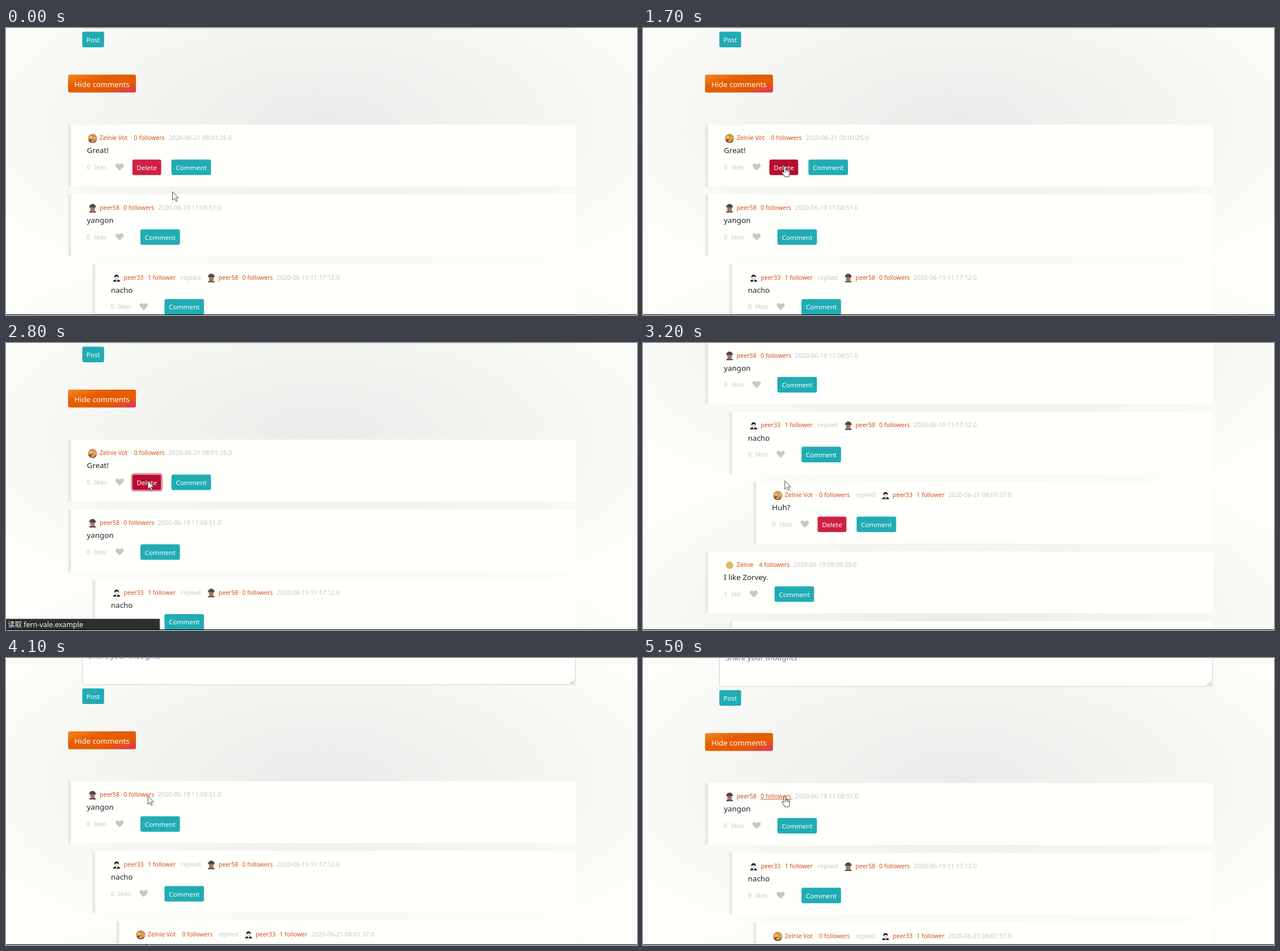
An HTML page for the animation above (5600 ms loop, 1108 px wide and 505 px high).

```html
<!DOCTYPE html>
<html lang="en">
<head>
<meta charset="utf-8">
<title>Comment thread</title>
<style>
  html, body { margin: 0; width: 100%; height: 100%; overflow: hidden; }
  #stage {
    position: relative; width: 1108px; height: 505px; overflow: hidden;
    background: radial-gradient(ellipse farthest-corner at center, #ebece9, #fdfefa 87%) 0 0 / 1108px 505px;
  }
  svg { position: absolute; inset: 0; display: block; }
  text { font-family: "Noto Sans", "Open Sans", sans-serif; white-space: pre; }
  .link { font-size: 10.5px; fill: #d4501a; }
  .soft { font-size: 10.6px; fill: #c6c8c7; }
  .date { font-size: 10.8px; fill: #c3c5c5; }
  .body { font-size: 13.3px; fill: #212529; }
  .btn { font-size: 11.65px; fill: #fff; }
  .big { font-size: 13.1px; fill: #fff; }
  .hint { font-size: 13.1px; fill: #6c757d; }
  .status { font-size: 12.4px; fill: #f1f1f1; font-family: "Noto Sans", "Noto Sans CJK SC", "Noto Sans CJK", sans-serif; }
</style>
</head>
<body>
<div id="stage">
<svg width="1108" height="505" viewBox="0 0 1108 505">
  <defs>
    <linearGradient id="warm" x1="0" y1="0" x2="1" y2="1">
      <stop offset="0" stop-color="#f6891f"/>
      <stop offset=".35" stop-color="#e65c00"/>
      <stop offset=".68" stop-color="#e65c00"/>
      <stop offset="1" stop-color="#dc3265"/>
    </linearGradient>
    <g id="amber">
      <circle r="8" fill="#d2924a"/>
      <path d="M-7.4 3Q-3 0 0 3T7.4 3A8 8 0 0 1-7.4 3Z" fill="#74502f"/>
      <ellipse cx="-3" cy="-2" rx="2.6" ry="2" fill="#edc98c"/>
      <ellipse cx="3.4" cy="-1" rx="2.4" ry="2.2" fill="#e2ad5f"/>
      <ellipse cx="0" cy="4.6" rx="3.4" ry="1.5" fill="#d9a866"/>
    </g>
    <g id="rider">
      <path d="M-6 7.6Q-5.6 4 0 4T6 7.6Z" fill="#55545a"/>
      <ellipse cy="1" rx="4.2" ry="4.8" fill="#a87563"/>
      <path d="M-6.2-1.4Q-4.8-7.6 0-7.6T6.2-1.4Z" fill="#514747"/>
    </g>
    <g id="dark">
      <path d="M-6.4 6.4Q-5.8 2.6 0 2.6T6.4 6.4Z" fill="#1d1d20"/>
      <path d="M-2 3L0 6.4 2 3Z" fill="#f3f1ee"/>
      <ellipse cy="-.4" rx="3.2" ry="3.6" fill="#e6dcd6"/>
      <path d="M-4 0Q-4.8-6-.2-6T4 0Q3.2-3 0-2.8T-4 0Z" fill="#19191b"/>
    </g>
    <g id="gold"><circle r="6.5" fill="#e3b765"/></g>
    <path id="heart" d="M0 6.4L-6 .3C-9.2-3.2-5.4-8.2-1-4.9L0-3.9 1-4.9C5.4-8.2 9.2-3.2 6 .3Z" fill="#c6c7c7"/>
  </defs>
  <g id="page"></g>
  <g id="note">
    <rect x="-1" y="485.5" width="271" height="20" fill="#2e2e30" stroke="#77787a"/>
    <text class="status" x="3" y="500">读取 fern-vale.example</text>
  </g>
  <rect y="504" width="1108" height="1" fill="#000"/>
  <g id="arrow" fill="#fff" stroke="#3c3c3c" stroke-width=".9">
    <path d="M0 0V15L3.6 11.6 6 17 8.1 16.1 5.8 10.8H10.4Z"/>
  </g>
  <g id="hand" fill="#fff" stroke="#2c2c2c" stroke-width=".9" stroke-linejoin="round">
    <path d="M-1.5 12V2.2a1.5 1.5 0 0 1 3 0V7.4a1.4 1.4 0 0 1 2.6.3a1.4 1.4 0 0 1 2.5.5a1.3 1.3 0 0 1 2.1 1.1V13.5c0 2-1 3-1.2 6H-.2c-.5-2.5-3-4.5-4.6-7.2c-.9-1.8.9-2.6 1.9-1.6Z"/>
    <path d="M1.5 7.4v3.6M4.1 7.7v3.5M6.6 8.3v3" fill="none"/>
  </g>
</svg>
</div>
<script>
const $ = id => document.getElementById(id);
const LOOP = 5600, PITCH = 122.8, INDENT = 42.3, META = 27.2;
const PAPER = "#fffffc", TEAL = "#21acb4", RED = "#cf2045", DEEP_RED = "#b80d31";

const text = (cls, x, y, s, anchor = "start") =>
  `<text class="${cls}" x="${x}" y="${y}" text-anchor="${anchor}">${s}</text>`;
const box = (x, y, w, h, fill, extra = "") =>
  `<rect x="${x}" y="${y}" width="${w}" height="${h}" fill="${fill}" ${extra}/>`;
const button = (x, y, w, label, fill, id = "") =>
  box(x, y, w, 27.4, fill, `rx="3" ${id && `id="${id}"`}`) +
  text("btn", x + w / 2, y + 18.4, label, "middle");
const icon = (name, x, y) => `<use href="#${name}" x="${x}" y="${y}"/>`;

// One person: avatar, name, dot and follower count, at offsets from x
const person = ([face, name, count], x, dotX, countX) =>
  icon(face, x, 24.3) + text("link", x + 12.5, META, name) +
  text("soft", dotX, META, "·", "middle") + text("link", countX, META, count);

const ZELNIE_V = ["amber", "Zelnie Vot", "0 followers"];
const PEER_58 = ["rider", "peer58", "0 followers"];
const PEER_33 = ["dark", "peer33", "1 follower"];
const ZELNIE = ["gold", "Zelnie", "4 followers"];

function card(row, depth, c) {
  const left = 109 + depth * INDENT;
  let out = box(left, 0, 1000.5 - left, 108.8, PAPER) + box(left, 0, 5.4, 108.8, "#e8e9e8");
  if (c) {
    const shift = c.likes === "1" ? -5 : 0;
    out += person(c.who, left + 43, c.at[0], c.at[1]);
    if (c.to) out += text("soft", c.at[2], META, "replied") + person(c.to, c.at[3], c.at[4], c.at[5]);
    out += text("date", c.dateX, META, c.date) + text("body", left + 33, 50.4, c.say);
    out += text("soft", left + 33, 78.8, c.likes) + text("soft", left + 46, 78.8, shift ? "like" : "likes");
    out += icon("heart", left + 90.5 + shift, 74.6);
    if (c.own) out += button(left + 113, 61.4, 50.5, "Delete", RED, c.own);
    out += button(left + (c.own ? 181.5 : 127 + shift), 61.4, 69.4, "Comment", TEAL);
  }
  return `<g transform="translate(0 ${row * PITCH})">${out}</g>`;
}

const first = card(0, 0, {
  who: ZELNIE_V, at: [220.5, 224.8], dateX: 285.3, date: "2020-06-21 08:01:25.0",
  say: "Great!", likes: "0", own: "del"
});
const thread = [
  [0, {
    who: PEER_58, at: [202, 206.5], dateX: 266.8, date: "2020-06-19 11:08:51.0",
    say: "yangon", likes: "0"
  }],
  [1, {
    who: PEER_33, to: PEER_58, at: [244.7, 249, 307.3, 360.5, 410.3, 414.8],
    dateX: 475, date: "2020-06-19 11:17:12.0", say: "nacho", likes: "0"
  }],
  [2, {
    who: ZELNIE_V, to: PEER_33, at: [305, 309.3, 373, 426, 476.2, 480.6],
    dateX: 535.8, date: "2020-06-21 08:01:37.0", say: "Huh?", likes: "0", own: "del2"
  }],
  [0, {
    who: ZELNIE, at: [200, 203.8], dateX: 264, date: "2020-06-19 09:59:29.0",
    say: "I like Zorvey.", likes: "1"
  }],
  [1, null]
];

$("page").innerHTML =
  box(134.2, -300, 866, 130, PAPER, 'rx="3" stroke="#cbcdd3"') +
  text("hint", 144.8, -216, "Share your thoughts") +
  '<path d="M997-179v1.6M994-176v1.6M997-176v1.6M991-173.4v1.6M994-173.4v1.6M997-173.4v1.6" stroke="#a2a4a6" stroke-width="1.6"/>' +
  button(134, -163.4, 38.3, "Post", TEAL) +
  box(109, -88, 119.2, 31.6, "url(#warm)", 'rx="3"') +
  text("big", 168.5, -66, "Hide comments", "middle") +
  `<g id="first">${first}` +
  box(220.7, 60.1, 53.2, 30, "none", 'id="ring" rx="4" stroke="#e79aab" stroke-width="2.7"') + "</g>" +
  `<g id="rest">${thread.map(([depth, c], row) => card(row, depth, c)).join("")}` +
  box(206.5, 28, 56, 0.9, "#d4501a", 'id="line"') + "</g>";

// [time, y of the comment list]
const SCROLL = [[0, 170], [3000, -1.6], [3800, 3], [3900, 28], [4000, 128], [4100, 217], [4200, 219.4], [4300, 220]];
// [time, x, y]
const PATH = [[0, 292.4, 288], [300, 292.4, 288], [500, 276, 268], [700, 256, 250], [900, 249, 242.4], [LOOP, 249, 242.4]];

const held = (table, t) => table.filter(k => k[0] <= t).pop()[1];

function pointer(t) {
  const i = Math.max(1, PATH.findIndex(k => k[0] > t));
  const [a, b] = [PATH[i - 1], PATH[i]];
  const p = (t - a[0]) / (b[0] - a[0]);
  return [1, 2].map(n => a[n] + (b[n] - a[n]) * p);
}

const show = (id, on) => { $(id).style.display = on ? "" : "none"; };

function draw(now) {
  const t = Math.floor((now % LOOP) / 100) * 100;
  const y = held(SCROLL, t);
  const [px, py] = pointer(t);
  const gone = t >= 3000;
  const overButton = t >= 700 && !gone;
  const overLink = t >= 4300;
  const handOn = (overButton && t < 2600) || overLink;

  $("stage").style.backgroundPositionY = `${y + 250}px`;
  $("page").setAttribute("transform", `translate(0 ${y})`);
  $("rest").setAttribute("transform", `translate(0 ${gone ? 0 : PITCH})`);
  $("del").setAttribute("fill", overButton ? DEEP_RED : RED);
  show("first", !gone);
  show("ring", t >= 2400);
  show("line", overLink);
  show("note", t >= 2600 && t < 3100);
  show("hand", handOn);
  show("arrow", !handOn);
  for (const id of ["hand", "arrow"]) $(id).setAttribute("transform", `translate(${px} ${py})`);
}

function tick() {
  draw(performance.now());
  requestAnimationFrame(tick);
}
tick();
</script>
</body>
</html>
```
